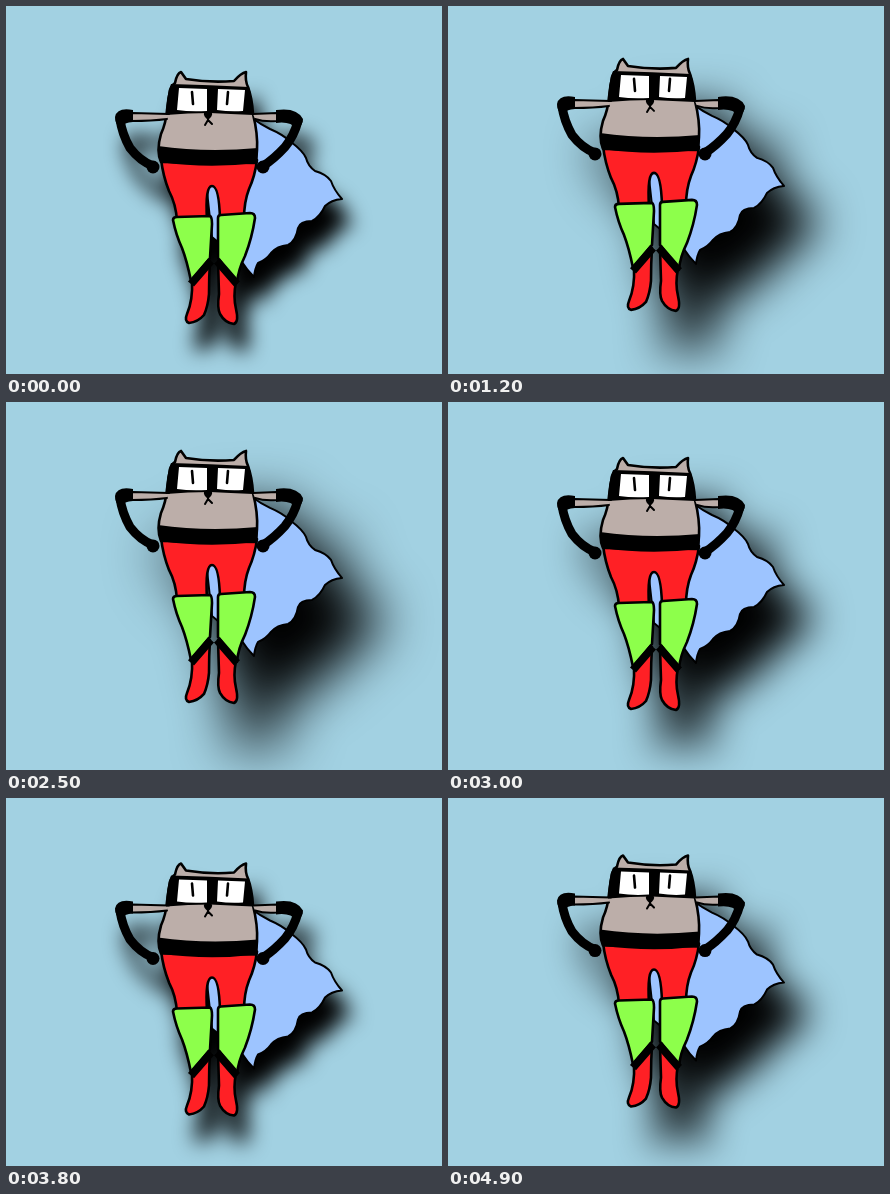
An HTML page for the animation above (5 s loop, 436 by 368 pixels).

```html
<!DOCTYPE html>
<html lang="en">
<head>
<meta charset="utf-8">
<title>Floating hero cat</title>
<style>
  html, body { margin: 0; width: 100%; height: 100%; overflow: hidden; background: #a2d1e2; }
  svg { display: block; width: 436px; height: 368px; overflow: visible; }
  .line { stroke: #000; stroke-width: 2.6; stroke-linejoin: round; stroke-linecap: round; }
  .fur { fill: #bcaea9; }
  .red { fill: #ff2025; }
  .green { fill: #8dff4b; }
  .cape { fill: #9dc4ff; }
  .eye { fill: #fff; }
  .bare { fill: none; }
</style>
</head>
<body>
<svg id="stage" viewBox="0 0 436 368">
  <g id="hero">
    <path class="cape line" style="stroke-width:2" d="M246 112 Q254 118 264 123 Q276 128 285 136 Q297 145 300 152 Q302 160 309 165 Q320 168 325 175 Q328 184 336 193 Q325 194 319 200 Q314 211 306 215 Q294 215 292 222 Q290 235 282 239 Q271 240 265 247 Q260 254 252 257 Q249 262 248 271 Q241 264 236 256 L206 231 L200 176 Z"/>

    <!-- trousers -->
    <path class="red line" d="M155 153 L251 154 Q249 170 243 183 Q238 196 238 213 L214 213 Q213 180 206 180 Q199 180 201 214 L171 215 Q170 198 163 185 Q157 170 155 153 Z"/>

    <!-- boots -->
    <path class="red line" d="M186 275 L204 255 Q203 270 203 288 Q202 300 198 309 Q192 316 183 317 Q178 315 181 308 Q187 294 186 275 Z"/>
    <path class="red line" d="M212 255 L230 276 Q227 290 230 303 Q233 316 228 318 Q219 317 214 308 Q211 302 213 288 Z"/>
    <path class="green line" d="M167 214 Q167 211 171 211 L204 210 Q206 211 206 218 L204 252 L185 275 Q181 255 176 242 Q170 229 167 214 Z"/>
    <path class="green line" d="M212 212 Q212 209 215 209 L244 207 Q249 207 249 212 Q246 232 239 250 Q232 264 231 277 L212 252 Z"/>
    <path class="bare line" style="stroke-width:8;stroke-linecap:butt" d="M205 255 L185 278 M211 255 L231 278"/>

    <!-- body -->
    <path class="fur line" d="M164 84 Q166 79 169 77 Q171 67 175 66 L180 73 Q204 77 228 75 Q235 67 240 66 Q239 75 242 81 Q246 92 247 108 Q252 128 251 144 L250 157 L155 156 Q150 145 155 128 Q160 117 161 104 Z"/>
    <path d="M152 140 Q200 147 252 142 L251 157 Q202 163 154 156 Z"/>

    <!-- arms -->
    <path class="fur line" style="stroke-width:2" d="M163 108 L126 107 L126 115 Q146 115 161 113 M247 108 L271 107 L271 115 Q258 116 249 113"/>
    <path class="bare line" style="stroke-width:9" d="M114 113 Q116 128 124 142 Q134 155 147 160 M292 115 Q288 130 279 141 Q268 153 257 160"/>
    <path d="M127 104 Q111 101 109 111 Q109 119 115 122 Q118 116 127 116 Z M270 104 Q291 101 297 113 Q297 120 290 123 Q285 115 270 117 Z"/>
    <circle cx="147" cy="161" r="6.5"/>
    <circle cx="257" cy="161" r="6.5"/>

    <!-- face -->
    <path d="M165 78 Q204 79 243 81 Q246 91 247 106 L247 109 Q224 108 204 107 Q182 107 160 109 Q160 90 165 78 Z"/>
    <path class="eye" d="M173 82 L201 83 L201 105 Q184 106 171 104 Z M212 83 L239 84 L237 105 Q224 106 211 104 Z"/>
    <path class="bare line" d="M186 86 L187 98 M222 86 L221 98"/>
    <path d="M198 107 Q202 104 206 107 Q207 110 202 114 Q197 110 198 107 Z"/>
    <path class="bare line" style="stroke-width:2" d="M202 111 L202 114 L199 119 M202 114 L206 118"/>
  </g>
</svg>
<script>
  const LOOP = 5000, STEP = 100, BOB = 4000;
  const stage = document.getElementById('stage');
  const hero = document.getElementById('hero');
  const mix = (a, b, p) => a + (b - a) * p;

  function draw(now) {
    const t = Math.floor(now % LOOP / STEP) * STEP;
    const p = (1 - Math.cos(2 * Math.PI * t / BOB)) / 2;
    hero.setAttribute('transform', `translate(0 ${-20 * p})`);
    // the shadow drifts away and softens as the hero rises
    stage.style.filter =
      `drop-shadow(${mix(10, 50, p)}px ${mix(26, 53, p)}px ${mix(10, 30, p)}px #000)`;
  }

  let start;
  function tick(now) {
    start ??= now;
    draw(now - start);
    requestAnimationFrame(tick);
  }
  draw(0);
  requestAnimationFrame(tick);
</script>
</body>
</html>
```
